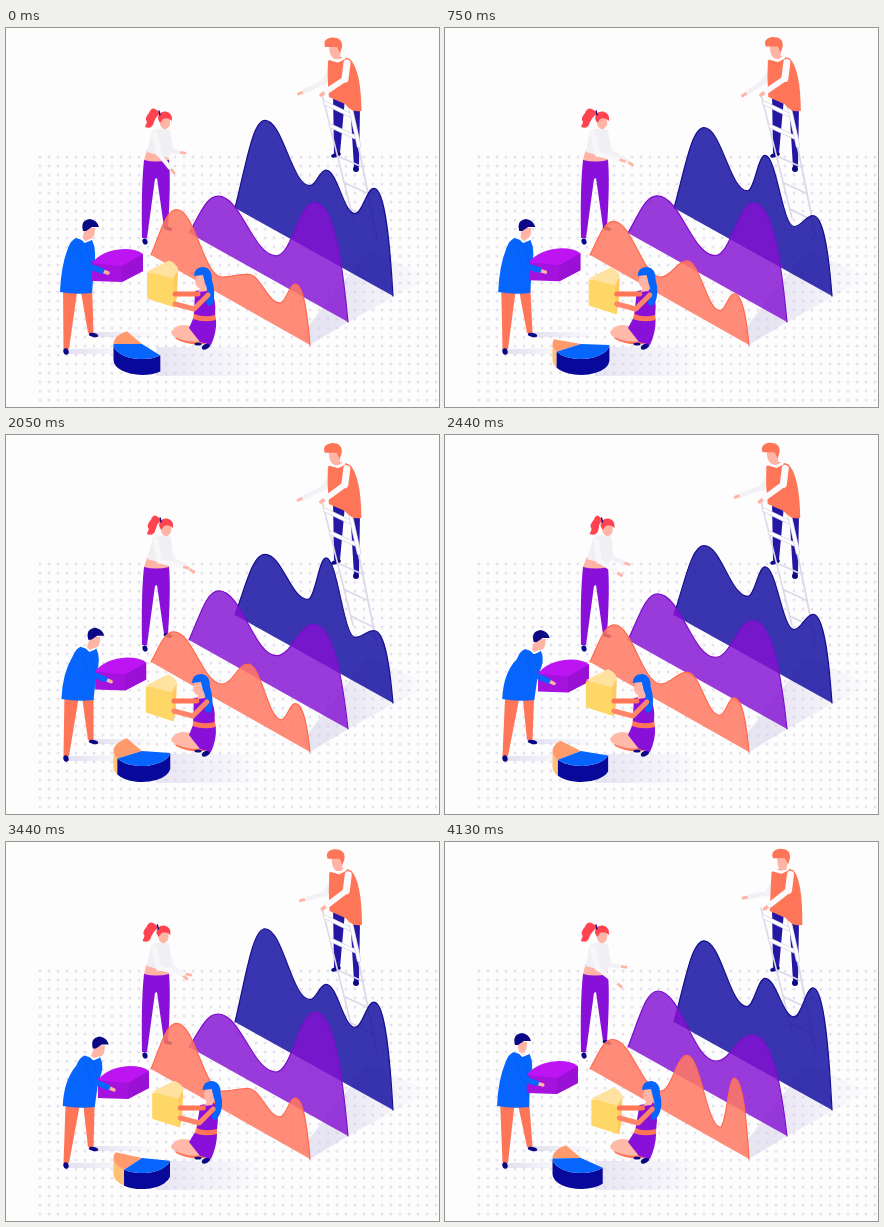
Recreate the animation shown at these times as an HTML page with a canvas. Size 433 px wide and 379 px high, loop 4.21 s.

```html
<!DOCTYPE html>
<html lang="en">
<head>
<meta charset="utf-8">
<title>Chart team</title>
<style>
  html, body { margin: 0; width: 100%; height: 100%; overflow: hidden; background: #fdfdfd; }
  canvas { display: block; width: 433px; height: 379px; }
</style>
</head>
<body>
<canvas id="stage"></canvas>
<script>
const LOOP = 4210;
const NAVY = '#2417a3', DARK = '#0b0885', BLUE = '#0665fd', PURPLE = '#8810d8';
const CORAL = '#ff7558', SKIN = '#ffb4a5', WHITE = '#f3f1f6', RAIL = '#dcd8e9';

const stage = document.getElementById('stage');
const g = stage.getContext('2d');
const ratio = window.devicePixelRatio || 1;
stage.width = 433 * ratio;
stage.height = 379 * ratio;

const dots = new Path2D();
for (let y = 129; y < 379; y += 9)
  for (let x = 34; x < 433; x += 9) {
    dots.moveTo(x + 1.5, y);
    dots.arc(x, y, 1.5, 0, 7);
  }

let time = 0;

// Eased travel through a few [time, value] turning points.
function track(...p) {
  let i = 0;
  while (i < p.length - 2 && time >= p[i + 1][0]) i++;
  const [t0, v0] = p[i], [t1, v1] = p[i + 1];
  const u = Math.min(1, Math.max(0, (time - t0) / (t1 - t0)));
  return v0 + (v1 - v0) * u * u * (3 - 2 * u);
}
function wave(mid, reach, period, peak) {
  return mid + reach * Math.cos((time - peak) / period * 2 * Math.PI);
}

function fill(color, d) {
  g.fillStyle = color;
  g.fill(new Path2D(d));
}
function oval(color, x, y, rx, ry, turn = 0) {
  g.fillStyle = color;
  g.beginPath();
  g.ellipse(x, y, rx, ry, turn, 0, 7);
  g.fill();
}
function line(color, width, ...p) {
  g.strokeStyle = color;
  g.lineWidth = width;
  g.beginPath();
  for (let i = 0; i < p.length; i += 2) g.lineTo(p[i], p[i + 1]);
  g.stroke();
}
function shadow(x1, x2, alpha, d) {
  const grad = g.createLinearGradient(x1, 0, x2, 0);
  grad.addColorStop(0, `rgba(211,205,233,${alpha})`);
  grad.addColorStop(1, 'rgba(211,205,233,0)');
  fill(grad, d);
}
// Sleeve from shoulder over elbow, ending in a bare hand.
function arm(sleeve, width, sx, sy, ex, ey, hx, hy) {
  const k = Math.max(0, 1 - 7 / Math.hypot(hx - ex, hy - ey));
  const wx = ex + (hx - ex) * k, wy = ey + (hy - ey) * k;
  line(SKIN, width * .5, wx, wy, hx, hy);
  line(sleeve, width, sx, sy, ex, ey);
  line(sleeve, width * .8, ex, ey, wx, wy);
}

// Level tangents at every crest and dip, free ends on the baseline.
function hills(color, edge, alpha, [sx, sy], [ex, ey], ...pts) {
  let [px, py] = pts[0];
  const rise = (px - sx) * .4;
  let d = `M${sx} ${sy}C${sx + rise} ${sy + (py - sy) * .55} ${px - rise} ${py} ${px} ${py}`;
  for (const [x, y] of pts.slice(1)) {
    const k = (x - px) * .4;
    d += `C${px + k} ${py} ${x - k} ${y} ${x} ${y}`;
    px = x; py = y;
  }
  d += `C${px + (ex - px) * .6} ${py} ${ex - (ex - px) * .15} ${py + (ey - py) * .55} ${ex} ${ey}`;
  g.globalAlpha = alpha;
  fill(color, d);
  g.globalAlpha = 1;
  g.strokeStyle = edge;
  g.lineWidth = 1.2;
  g.stroke(new Path2D(d));
}

// Three blends move all crests: dip, swell and the late lift on the right.
function blends() {
  return {
    dip: track([200, .06], [1290, 1], [3300, 0], [4130, .7]),
    swell: track([600, .2], [2050, .85], [3440, 0], [4130, 1]),
    lift: track([3440, 0], [4130, 1])
  };
}
function navyHills({ dip, swell, lift }) {
  hills('#1e18a4', '#17118f', .88, [229, 180], [387, 268],
    [259, 86 + 14 * dip + 28 * swell - 25 * lift],
    [304 - 3 * dip, 157 + 11 * dip],
    [320, 144 - 31 * dip + 14 * lift],
    [349, 184 + 27 * dip - 28 * lift],
    [368, 157 + 57 * dip - 51 * lift]);
}
function purpleHills({ swell, lift }) {
  hills('#8412d4', '#7b0dcc', .82, [183, 205], [342, 294],
    [212 + swell, 172 - 19 * swell - 4 * lift],
    [270 + swell, 230 - 11 * swell],
    [309 - 2 * swell, 170 + 23 * swell]);
}
function coralHills({ dip, lift }) {
  hills('#ff7a62', '#ff6a50', .86, [145, 227], [304, 317],
    [171 - 5 * dip, 180 + 25 * dip],
    [216, 249],
    [242, 248 - 28 * dip - 15 * lift],
    [274 + 2 * dip, 274 + 16 * dip],
    [289, 255 + 20 * dip - 33 * lift]);
}

function floor() {
  g.fillStyle = '#e5e2eb';
  g.fill(dots);
  shadow(330, 424, .5, 'M362 222L424 249L342 294L304 317L296 306Z');
  shadow(150, 258, .5, 'M150 319L262 319L252 348L150 348Z');
  shadow(86, 152, .6, 'M86 304L152 304L146 309L86 309Z');
  shadow(62, 125, .6, 'M62 321L125 320L120 326L62 326Z');
}

function ladder() {
  const rail = (...p) => {
    line(RAIL, 4.5, ...p);
    line('#fff', 2.7, ...p);
  };
  line(RAIL, 1.6, 316, 66, 347, 190);
  for (let y = 128; y < 190; y += 26.5) {
    const k = (y - 66) / 124;
    line(RAIL, 1.6, 316 + 31 * k, y, 341 + 30 * (y - 53) / 147, y + 11);
  }
  line(RAIL, 1.8, 352, 116, 371, 210);
  rail(319, 75, 344, 87);
  rail(325, 98, 349, 109);
  rail(341, 64, 353, 118);
}

function climber() {
  const d = track([0, 0], [1000, 2], [2900, -2], [4130, 9]), s = d * .5;
  const y = -time / 1500, hem = d * .2;
  fill(NAVY, 'M327 64L339 70L334 125L328 125Z');
  fill(NAVY, 'M344 74L354 78L353 139L348 139Z');
  oval(DARK, 330, 127, 5, 2.2, -.3);
  oval(DARK, 350, 141, 3, 3);
  ladder();
  arm(WHITE, 6, 325 + s, 43 + y, 318 + s, 54 + y,
    wave(294, 4, 3200, 1000), track([0, 66], [1290, 69], [3000, 60], [4130, 56]));
  fill(CORAL, `M${322 + s} ${33 + y}Q${333 + s} ${26 + y} ${344 + s} ${31 + y}Q${355 + s * .6} ${42 + y} ${355.5 + hem} 83Q${346 + hem} 85 ${339 + hem} 76L${323 + hem} 69Q${321 + s} 50 ${322 + s} ${33 + y}Z`);
  line('#fff', 3, 325 + s, 31 + y, 332 + s, 33 + y, 338 + s, 30 + y);
  arm('#fcfafd', 7, 341 + s, 35 + y, 339 + s, 51 + y, 315 + s, 67);
  fill(SKIN, `M${323 + d} ${17 + y}L${335 + d} ${17 + y}L${334 + d * .8} ${31 + y}L${328 + d * .8} ${31 + y}Q${323 + d} ${28 + y} ${323 + d} ${17 + y}Z`);
  fill(CORAL, `M${319 + d} ${19 + y}Q${316 + d} ${11 + y} ${325 + d} ${9.5 + y}Q${337 + d} ${9 + y} ${336 + d} ${19 + y}L${334 + d} ${25 + y}L${331 + d} ${19 + y}Z`);
}

function presenter() {
  const d = track([0, 0], [1290, -3], [2650, 4], [3600, -2]), s = d * .6;
  const beat = wave(0, 1, 1350, 700);
  fill(PURPLE, 'M138 132L163 131Q165 155 162 199L158 199L151 150L149 151L141 210L136 210Q135 160 138 132Z');
  oval(DARK, 139, 213.5, 2.5, 3.2, -.3);
  oval(DARK, 162, 200.5, 4.5, 1.9, .3);
  arm(WHITE, 5.5, 161 + s, 105, 165 + s * .5, 123,
    track([0, 179], [1290, 193], [3000, 181]), 131 + 6 * beat);
  fill(SKIN, `M${141 + s * .3} 122L${161 + s * .3} 122L163 132Q150 135 138 132Z`);
  fill('#f0eff3', `M${146 + s} 103Q${156 + s} 98 ${164 + s} 102Q${167 + s} 115 ${163 + s * .3} 130L${141 + s * .3} 124Z`);
  arm('#f7f6f9', 5.5, 149 + s, 106, 153 + s * .5, 126, 173 + 5 * beat + time / 500, 139 - 6 * beat);
  const p = d * 1.6 - 1;
  fill('#ff4450', `M${152 + d} 83Q${147 + p} 77 ${144 + p} 85Q${139 + p} 90 ${142 + p} 94L${140 + p} 99Q${147 + p} 102 ${149 + p} 94Q${150 + d} 88 ${154 + d} 86Z`);
  oval(SKIN, 159 + d, 94, 5.2, 7.2);
  fill('#ff4450', `M${152 + d} 91Q${152 + d} 83 ${160 + d} 83.5Q${167 + d} 85 ${166 + d} 93Q${162 + d} 89 ${157 + d} 91L${154 + d} 95Z`);
  line(DARK, 1.3, 153 + d, 83, 154 + d, 87);
}

function pie() {
  const cx = 136, cy = 316, rx = 28.5, ry = 15, deep = 16, rad = Math.PI / 180;
  const a = wave(27, 23, 1450, 0) * rad;
  const b = track([0, 180], [1290, 130], [2050, 150], [3300, 125], [4130, 178]) * rad;
  const c = wave(214, 24, 2060, 0) * rad;
  const wedge = (top, side, from, to) => {
    const stop = Math.max(from, Math.min(to, Math.PI));
    g.fillStyle = side;
    g.beginPath();
    g.ellipse(cx, cy, rx, ry, 0, from, stop);
    g.ellipse(cx, cy + deep, rx, ry, 0, stop, from, true);
    g.fill();
    g.fillStyle = top;
    g.beginPath();
    g.moveTo(cx, cy);
    g.ellipse(cx, cy, rx, ry, 0, from, to);
    g.fill();
  };
  wedge('#ff9a6d', '#ffc274', b, c);
  wedge(BLUE, '#08089a', a, b);
}

function carrier() {
  const h = track([0, 0], [1200, -4], [3050, 17], [4130, -7]);
  const v = Math.max(0, h * .35), w = h * .28, s = Math.max(h * .85, h * .2);
  const x = 86 + h * .6, y = 221 + h * .3, r = y + 5, front = y + 17;
  fill(CORAL, `M${57 + w} 258L${72 + w} 258L63 321L57.5 321Z`);
  fill(CORAL, `M${74 + w} 258L${86 + w} 258L87.5 305L82 305Z`);
  oval(DARK, 60, 323.5, 2.7, 3.2, -.2);
  oval(DARK, 87.5, 307, 4.8, 2, .2);
  fill(SKIN, `M${79 + h} ${200 + v}L${89 + h} ${200 + v}Q${89 + h} ${211 + v} ${84 + h} ${211 + v}L${82 + s} ${216 + v}L${76 + s} ${212 + v}Z`);
  fill(BLUE, `M${70 + s} ${210 + v}L${79 + s} ${213 + v}L${86 + s} ${212 + v}Q${91 + s} ${222 + v} ${88 + w * 1.5} 240L${86 + w} 265Q${70 + w} 267 ${54 + w} 264Q${55 + w} 238 ${62 + s} ${220 + v}Q${65 + s} ${212 + v} ${70 + s} ${210 + v}Z`);
  line('#fff', 1.8, 76 + s, 211 + v, 79 + s, 214 + v, 84 + s, 212 + v);
  fill(DARK, `M${77 + h} ${203 + v}Q${74 + h} ${192 + v} ${84 + h} ${191 + v}Q${91 + h} ${192 + v} ${93 + h} ${199 + v}L${86 + h} ${199 + v}L${80 + h} ${203 + v}Z`);

  fill('#a511dd', `M${x} ${y + 12}L${x + 51} ${r}L${x + 51} ${r + 17}L${x + 30} ${y + 33}L${x} ${y + 32}Z`);
  fill('#9a10d5', `M${x + 30} ${front}L${x + 51} ${r}L${x + 51} ${r + 17}L${x + 30} ${y + 33}Z`);
  fill('#bd14f4', `M${x} ${y + 14}Q${x + 10} ${y + 1} ${x + 32} ${y}Q${x + 45} ${y} ${x + 51} ${r}L${x + 30} ${front}Z`);
  const ex = 82 + s * .8, ey = 238 + v * .5;
  line('#0558e2', 7.5, 76 + s, 219 + v, ex, ey);
  arm(BLUE, 7, 76 + s, 219 + v, ex, ey, x + 16, y + 24);
}

function kneeler() {
  const d = track([0, 0], [900, 5], [2050, -2], [3600, 9]), s = d * .6;
  const x = 141 + s, y = wave(239, 6.5, 2750, 1400);
  fill(CORAL, 'M168 303L196 309L199 316Q182 318 170 311Z');
  fill('#ffb9a8', 'M165 304Q172 293 187 299L197 313Q180 316 166 307Z');
  oval(DARK, 200, 318.5, 4.5, 2.5, -.5);
  oval(DARK, 192, 316, 3.5, 1.5);
  fill(PURPLE, `M${187 + s * .3} 291L${210 + s * .2} 291Q211 304 205 317L194 314L183 300Z`);
  fill(CORAL, `M${188 + s * .6} 284L${209 + s * .4} 284L${210 + s * .2} 292Q198 295 ${187 + s * .3} 291Z`);
  fill(PURPLE, `M${189 + s} 263L${203 + s} 261Q${211 + s * .5} 270 ${209 + s * .4} 287Q198 290 ${188 + s * .5} 286Z`);

  fill('#ffd766', `M${x} ${y + 12}L${x + 30} ${y + 12}L${x + 28} ${y + 47}L${x} ${y + 38}Z`);
  fill('#ffca62', `M${x + 26} ${y + 18}L${x + 31} ${y + 9}L${x + 30} ${y + 37}L${x + 27} ${y + 47}Z`);
  fill('#ffe2a0', `M${x} ${y + 11}L${x + 22} ${y}Q${x + 30} ${y + 3} ${x + 31} ${y + 9}L${x + 26} ${y + 18}Z`);

  line(CORAL, 5, 192 + s, 266, 182 + s, 266, x + 28, 266);
  oval(SKIN, 194 + d, 253, 4.8, 7.2);
  fill(SKIN, `M${194 + d} 256L${200 + d} 256L${201 + s} 263L${193 + s} 264Z`);
  fill(BLUE, `M${188 + d} 248Q${188 + d} 239 ${198 + d} 239Q${206 + d} 240 ${206 + d} 252Q${210 + d} 265 ${207 + s} 275Q${203 + s} 281 ${200 + s} 275Q${203 + d} 263 ${199 + d} 255L${197 + d} 247Z`);
  line('#ff8468', 5, 202 + s, 267, 188 + s, 281, x + 28, 276);
}

function draw(now) {
  time = now % LOOP;
  g.setTransform(ratio, 0, 0, ratio, 0, 0);
  g.lineCap = g.lineJoin = 'round';
  g.fillStyle = '#fdfdfd';
  g.fillRect(0, 0, 433, 379);
  const mix = blends();
  floor();
  climber();
  navyHills(mix);
  presenter();
  purpleHills(mix);
  coralHills(mix);
  pie();
  carrier();
  kneeler();
}

const begin = performance.now();
function tick() {
  draw(performance.now() - begin);
  requestAnimationFrame(tick);
}
tick();
</script>
</body>
</html>
```
